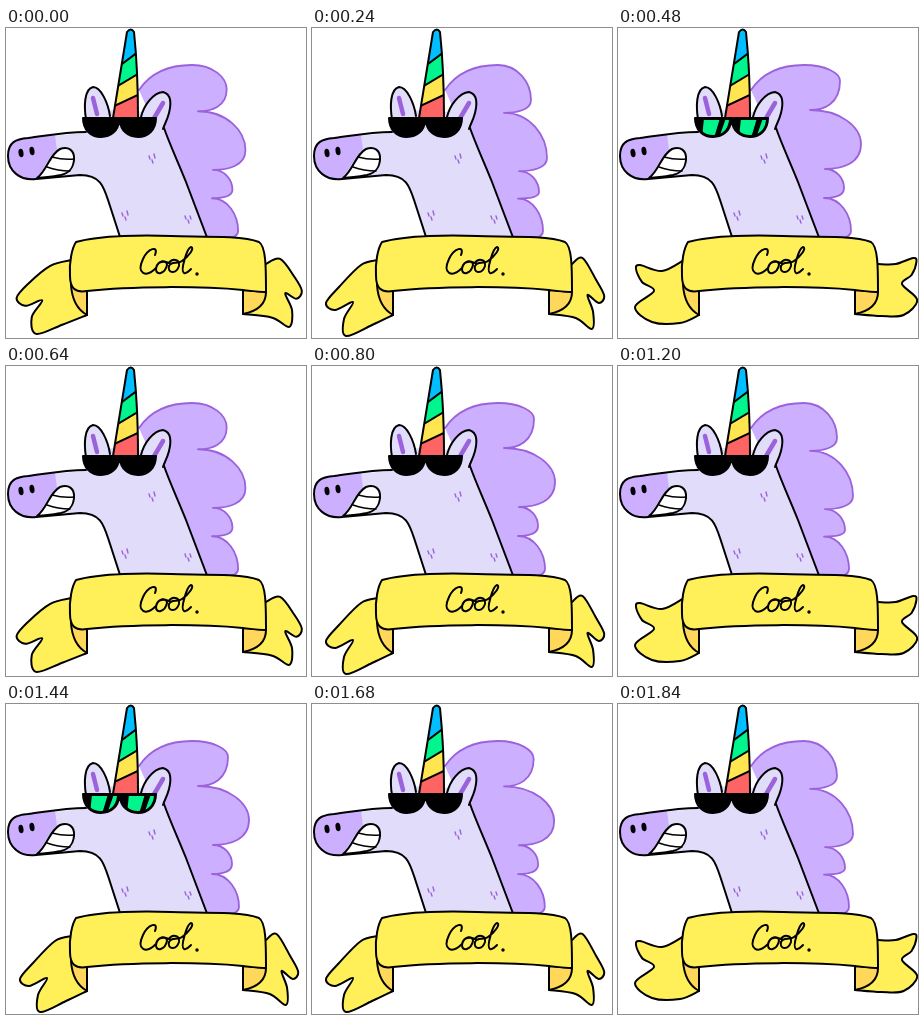
Recreate the animation shown at these times as an HTML page. Size 300x310 px, loop 1.92 s.

```html
<!DOCTYPE html>
<html lang="en">
<head>
<meta charset="utf-8">
<title>Cool unicorn</title>
<style>
  html, body { margin: 0; width: 100%; height: 100%; overflow: hidden; background: #fff; }
  svg { display: block; width: 300px; height: 310px; }
  .ink { stroke: #000; stroke-width: 2; }
  .none { fill: none; }
  .skin { fill: #e0dcfa; }
  .lilac { fill: #ccb0ff; }
  .gold { fill: #fff05a; }
  .shade { fill: #ffd75a; }
  .violet { stroke: #9b62dc; }
</style>
</head>
<body>
<svg viewBox="0 0 300 310" stroke-linecap="round" stroke-linejoin="round" role="img" aria-label="Cool.">
  <path id="mane" class="lilac violet" stroke-width="1.8"/>

  <!-- head and neck -->
  <path class="skin" d="M78 105L80 88L106 82L136 84L158 100C164 117 172 134 180 154L202 214H115L104 178C98 160 96 147 74 147L30 151C14 153 2 143 2 128C2 114 10 111 22 110Z"/>
  <path class="lilac" d="M49 107L22 110C10 111 2 114 2 128C2 143 14 152 29 151C38 143 42 128 51 122Z"/>
  <path class="ink none" d="M80 104C60 104 44 107 22 110C10 111 2 114 2 128C2 143 14 153 30 151L74 147C96 147 98 160 104 178L115 212M158 100C164 117 172 134 180 154L202 212"/>
  <g class="ink">
    <path fill="#fff" d="M31 150C41 143 43 127 54 121C62 118 69 122 68 132C67 141 63 145 55 147C46 149 38 149 31 150Z"/>
    <path class="none" stroke-width="1.5" d="M46 129Q57 132 68 131M41 139Q52 143 64 143"/>
  </g>
  <ellipse cx="15" cy="125" rx="2.5" ry="4.2" transform="rotate(-8 15 125)"/>
  <ellipse cx="26" cy="123" rx="2.5" ry="4.2" transform="rotate(-8 26 123)"/>
  <path class="violet none" stroke-width="1.4" d="M143 128l1 3M148 126l1 4M146 132l1 3M116 185l1 3M121 183l1 4M119 189l1 3M179 188l1 3M184 188l1 3M182 192l1 3"/>

  <!-- ears -->
  <g class="ink skin">
    <path d="M80 91C78 79 78 61 87 59C95 59 102 75 104 88"/>
    <path d="M135 89C138 77 147 65 157 64C166 66 165 77 163 85C161 93 158 97 157 101"/>
  </g>
  <path class="violet none" stroke-width="4.5" d="M87 70L91 86M157 75L147 92"/>

  <!-- horn -->
  <clipPath id="horn"><path d="M107 90L121 4Q125 -1 128 4Q132 42 132 90Z"/></clipPath>
  <g clip-path="url(#horn)" class="ink">
    <path fill="#ff6464" d="M100 60H140V95H100Z"/>
    <path fill="#ffe650" d="M100 82L140 63V30H100Z"/>
    <path fill="#00f58c" d="M100 65L140 41V10H100Z"/>
    <path fill="#00beff" d="M100 48L140 18V-5H100Z"/>
  </g>
  <path class="ink none" d="M107 90L121 4Q125 -1 128 4Q132 42 132 90"/>

  <!-- glasses -->
  <clipPath id="lens"><path d="M79 92H111C110 102 104 107 95 107C86 107 80 101 79 92ZM116 92H148C147 102 141 107 132 107C123 107 117 101 116 92Z"/></clipPath>
  <path class="ink" d="M77 90H150C150 102 142 109 132 109C122 109 115 103 113.500 92C112 103 105 109 95 109C85 109 77 102 77 90Z"/>
  <g clip-path="url(#lens)">
    <path id="glint" fill="#00f58c" d="M86 90H102L96 110H84ZM108 90H114L108 110H101ZM123 90H139L133 110H121ZM145 90H151L145 110H138Z"/>
  </g>

  <!-- ribbon -->
  <g class="ink">
    <path id="left" class="gold"/>
    <path id="right" class="gold"/>
    <path class="shade" d="M65 257C66 272 72 282 81 287V262Z"/>
    <path class="shade" d="M260 264C260 276 252 283 237 286V262Z"/>
    <path class="gold" d="M70 214C95 207 140 207 165 208S235 207 253 214C260 218 260 240 260 264C254 264 246 263 237 262C195 258 125 258 81 263C69 265 64 260 64 248C63 234 66 220 70 214Z"/>
  </g>
  <path class="ink none" d="M149 227C153 217 142 220 137 231C130 246 140 250 150 240C152 232 161 231 161 237C159 246 150 248 150 241C151 234 156 232 163 235C166 230 174 231 173 238C170 247 161 245 163 238C166 232 171 237 176 233C183 228 189 220 185 219C181 220 174 243 178 245C181 246 183 243 185 241"/>
  <circle cx="191" cy="246" r="1.7"/>
</svg>
<script>
const $ = id => document.getElementById(id);
const mix = (a, b, k) => a + (b - a) * k;

// Smooth open curve through key points
function spline(pts) {
  const at = i => pts[Math.max(0, Math.min(pts.length - 1, i))];
  let d = `M${pts[0]}`;
  for (let i = 0; i < pts.length - 1; i++) {
    const [a, b, c, e] = [-1, 0, 1, 2].map(k => at(i + k));
    const out = b.map((v, j) => v + (c[j] - a[j]) / 6);
    const back = c.map((v, j) => v - (e[j] - b[j]) / 6);
    d += `C${out} ${back} ${c}`;
  }
  return d;
}

// Each lock of hair bulges to a tip and tucks back into a notch
const locks = [
  { tip: [222, 53], notch: [192, 82], sway: [-3, 19] },
  { tip: [243, 116], notch: [207, 141], sway: [-8, 14] },
  { tip: [226, 160], notch: [206, 170], sway: [1, 4] },
  { tip: [233, 203], notch: [201, 213], sway: [-2, 0] }
];

function mane(sway) {
  let d = 'M133 62C145 44 165 37 186 37', x = 186, y = 37;
  for (const lock of locks) {
    const [tx, ty] = lock.tip.map((v, i) => v + lock.sway[i] * sway);
    const [nx, ny] = [lock.notch[0], lock.notch[1] + lock.sway[1] * sway * .15];
    d += `C${mix(x, tx, .6)} ${y} ${tx} ${mix(ty, y, .5)} ${tx} ${ty}`;
    d += `C${tx} ${mix(ty, ny, .8)} ${mix(nx, tx, .45)} ${ny} ${nx} ${ny}`;
    [x, y] = [nx, ny];
  }
  return d;
}

// Tail outline: upper edge, tip, notch, lower tip, lower edge
const hanging = [[49, 237], [27, 259], [14, 275], [23, 282], [41, 274], [32, 291], [34, 308], [60, 297]];
const lifted = [[44, 243], [22, 237], [18, 241], [24, 254], [36, 263], [17, 279], [34, 294], [62, 295]];

function tails(lift, spread) {
  const left = hanging.map((p, i) => p.map((v, j) => mix(v, lifted[i][j], lift) - (j ? 0 : spread)));
  const width = mix(.62, .8, lift);
  const right = left.map(([x, y]) => [260 + (66 - x) * width, y - 7]);
  $('left').setAttribute('d', spline([[66, 232], ...left, [81, 287]]));
  $('right').setAttribute('d', spline([[260, 236], ...right, [237, 286]]));
}

function draw(now) {
  const step = Math.floor(now % 1920 / 80);
  const beat = step >> 1 & 3;
  $('mane').setAttribute('d', mane((1 - (step + 1) % 4 / 3) ** 2));
  tails([.15, 0, 0, 1][beat], beat ? 0 : 4);
  $('glint').setAttribute('transform', `translate(${37 * (step % 12 - 6)})`);
}

const start = performance.now();
function tick() {
  draw(performance.now() - start);
  requestAnimationFrame(tick);
}
tick();
</script>
</body>
</html>
```
